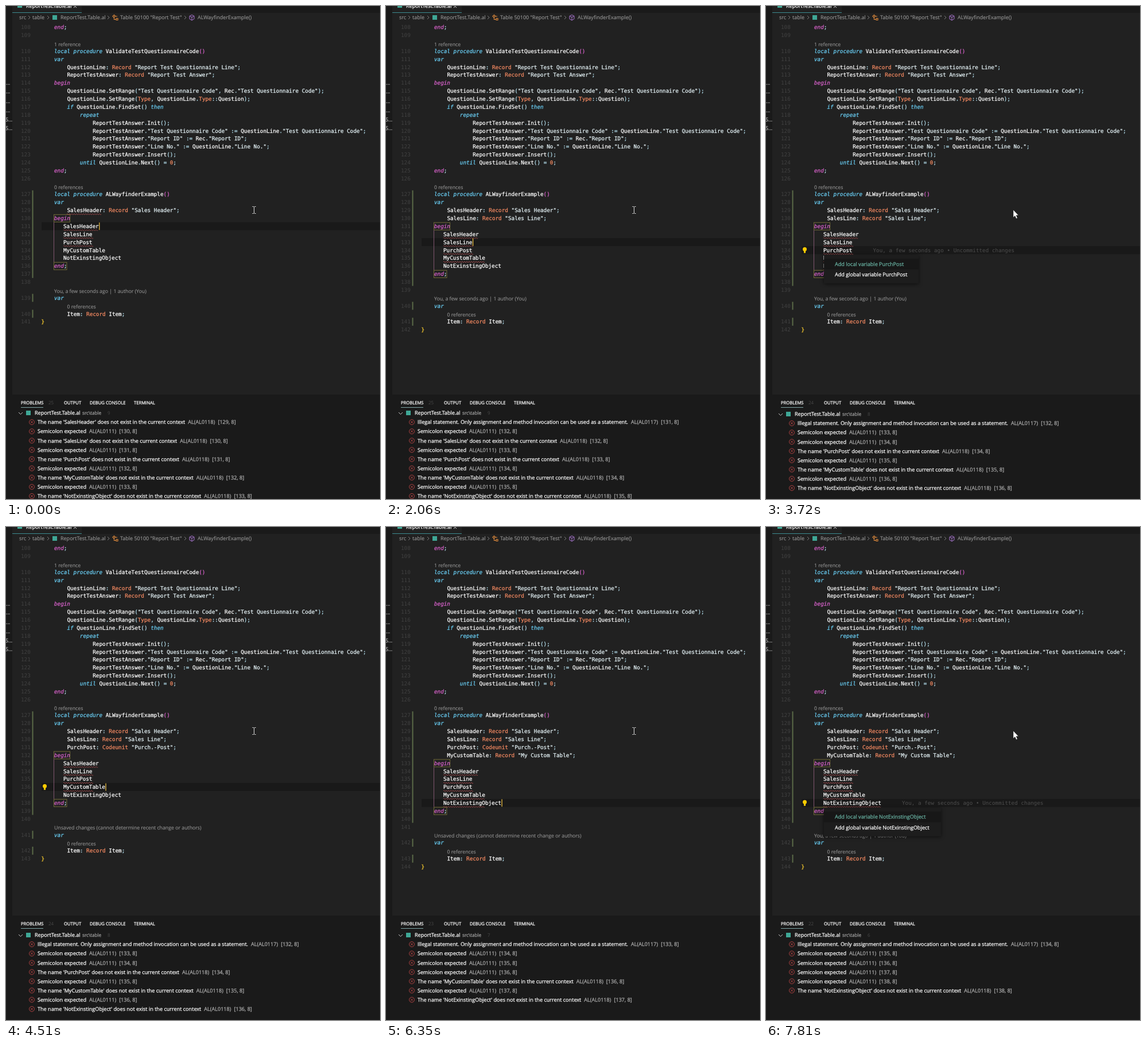
An HTML page for the animation above (8 s loop, 652x859 px).

```html
<!DOCTYPE html>
<html lang="en">
<head>
<meta charset="utf-8">
<title>Editor quick fixes</title>
<style>
html, body { margin: 0; width: 100%; height: 100%; overflow: hidden; background: #212121; }
svg { display: block; width: 652px; height: 859px; }
text { white-space: pre; text-rendering: geometricPrecision; color: #fff; font: 9.1px "Open Sans", "Noto Sans", sans-serif; }
text, tspan { fill: currentColor; stroke: currentColor; stroke-width: .25px; }
.code { font: 9.32px "DejaVu Sans Mono", "Noto Sans Mono", monospace; }
.code .kw { color: #69cdf3; font-style: italic; }
.code .block { color: #d862cb; font-style: italic; }
.code .paren { color: #d862cb; }
.code .type { color: #f58a62; }
.code .str { color: #e6f4f8; }
.code .op { color: #b5e0ef; }
.code.num { color: #414141; stroke-width: 0; }
.code.blame { color: #4d4d4d; stroke-width: 0; }
.code.gold { color: #ffd02e; }
.lens { color: #959595; font-size: 8.75px; stroke-width: .1px; }
.crumb { color: #9a9a9a; font-size: 9px; stroke-width: .1px; }
.tab { font-size: 7.65px; }
.dim { color: #adadad; }
.faint { color: #484848; font-size: 8px; stroke-width: 0; }
.path { color: #a2a2a2; font-size: 8.2px; }
.pick { color: #69b3a3; }
.wave { fill: none; stroke: #d45b5d; stroke-width: .7; }
.error { fill: none; stroke: #b84444; stroke-width: .9; }
</style>
</head>
<body>
<svg viewBox="0 0 652 859"><g id="back"></g><g id="live"></g></svg>
<script>
const CHAR = 5.61, PITCH = 13.87, LEFT = 61.5, LOOP = 8000;
const TEAL = '#3fa796';
const NAMES = ['SalesHeader', 'SalesLine', 'PurchPost', 'MyCustomTable', 'NotExinstingObject'];
const DECLS = [
  'SalesHeader: Record "Sales Header";', 'SalesLine: Record "Sales Line";',
  'PurchPost: Codeunit "Purch.-Post";', 'MyCustomTable: Record "My Custom Table";'
];
const FULL = NAMES.map(name => name.length);
const MENU_WIDTH = [162, 160, 165, 190, 204];
const YOU = 'You, a few seconds ago | 1 author (You)';
const UNSAVED = 'Unsaved changes (cannot determine recent change or authors)';

// Rows with "#" are reference hints and carry no line number.
const TOP = [
  [4, 'end;'], [0, ''], [4, '#1 reference'],
  [4, 'local procedure ValidateTestQuestionnaireCode()'], [4, 'var'],
  [8, 'QuestionLine: Record "Report Test Questionnaire Line";'],
  [8, 'ReportTestAnswer: Record "Report Test Answer";'],
  [4, 'begin'],
  [8, 'QuestionLine.SetRange("Test Questionnaire Code", Rec."Test Questionnaire Code");'],
  [8, 'QuestionLine.SetRange(Type, QuestionLine.Type::Question);'],
  [8, 'if QuestionLine.FindSet() then'], [12, 'repeat'],
  [16, 'ReportTestAnswer.Init();'],
  [16, 'ReportTestAnswer."Test Questionnaire Code" := QuestionLine."Test Questionnaire Code";'],
  [16, 'ReportTestAnswer."Report ID" := Rec."Report ID";'],
  [16, 'ReportTestAnswer."Line No." := QuestionLine."Line No.";'],
  [16, 'ReportTestAnswer.Insert();'],
  [12, 'until QuestionLine.Next() = 0;'],
  [4, 'end;'], [0, ''], [4, '#0 references'],
  [4, 'local procedure ALWayfinderExample()'], [4, 'var']
];

const STEPS = [
  [0, { decls: 1, cur: 0, lens: YOU, known: 0, badge: 25, waves: [11, 9, 9, 0, 0], declWave: 1, caret: 1, bulb: 0, blame: 0, menu: 0 }],
  [270, { cur: 1, lens: UNSAVED }],
  [690, { known: 1 }],
  [810, { waves: FULL, declWave: 0 }],
  [930, { bulb: 1 }],
  [1080, { caret: 0 }],
  [1200, { blame: 1 }],
  [1360, { lens: YOU }],
  [1510, { menu: 1 }],
  [1940, { menu: 0, caret: 1 }],
  [2060, { decls: 2, waves: [11, 9, 9, 13, 0], bulb: 0, blame: 0 }],
  [2460, { cur: 2, lens: UNSAVED }],
  [2740, { bulb: 1 }],
  [3010, { badge: 24, caret: 0 }],
  [3140, { waves: FULL }],
  [3300, { known: 2 }],
  [3420, { menu: 1 }],
  [3570, { blame: 1 }],
  [3720, { lens: YOU }],
  [3840, { menu: 0, caret: 1 }],
  [3960, { decls: 3, waves: [11, 9, 9, 9, 0], bulb: 0, blame: 0 }],
  [4390, { cur: 3, lens: UNSAVED }],
  [4510, { bulb: 1 }],
  [4800, { waves: [11, 9, 9, 13, 0], caret: 0 }],
  [5100, { known: 3, badge: 23 }],
  [5220, { waves: FULL }],
  [5340, { menu: 1 }],
  [5490, { blame: 1, lens: YOU }],
  [5800, { menu: 0, caret: 1 }],
  [5920, { decls: 4, waves: [11, 9, 9, 13, 13], bulb: 0, blame: 0 }],
  [6350, { cur: 4, lens: UNSAVED }],
  [6760, { waves: FULL, caret: 0 }],
  [7150, { known: 4, badge: 22, caret: 1 }],
  [7410, { bulb: 1, blame: 1, lens: YOU }],
  [7810, { menu: 1, caret: 0 }]
];

const rowY = row => 37 + PITCH * row;
const colX = col => LEFT + CHAR * col;
const text = (x, y, body, cls = '') => `<text x="${x}" y="${y + 3.2}" class="${cls}">${body}</text>`;
const rect = (x, y, w, h, fill, extra = '') => `<rect x="${x}" y="${y}" width="${w}" height="${h}" fill="${fill}" ${extra}/>`;
const line = (d, stroke, width = 1) => `<path d="${d}" fill="none" stroke="${stroke}" stroke-width="${width}"/>`;

const TOKENS = /("[^"]*")|\b(local|procedure|var|if|then|repeat|until)\b|\b(begin|end)\b|\b(Record|Codeunit|Type|0)\b|(\(\)$)|([.,:;=()]+)/g;
const KINDS = ['str', 'kw', 'block', 'type', 'paren', 'op'];
const paint = src => src.replace(TOKENS, (token, ...groups) =>
  `<tspan class="${KINDS[groups.slice(0, KINDS.length).findIndex(Boolean)]}">${token}</tspan>`);

function codeRows(rows, firstRow, firstNumber) {
  let number = firstNumber;
  return rows.map(([col, src], i) => {
    const y = rowY(firstRow + i), x = colX(col);
    if (src[0] === '#') return text(x, y + 1.6, src.slice(1), 'lens');
    return text(26, y, number++, 'code num') +
      (src === '}' ? text(x, y, src, 'code gold') : src && text(x, y, paint(src), 'code'));
  }).join('');
}

function wave(x, y, chars) {
  const humps = Math.round(chars * CHAR / 4);
  return `<path class="wave" d="M${x} ${y}${'q1-2 2 0t2 0'.repeat(humps)}"/>`;
}

function bracketBox(row, chars) {
  return rect(83.5, rowY(row) - 6.5, chars * CHAR, 13, 'none', 'stroke="#716a38"');
}

function problems(s) {
  const base = s.known ? 130 + s.known : 129;
  const missing = i => [`The name '${NAMES[i]}' does not exist in the current context`, 'AL0118', base + i];
  const list = [s.known ? ['Illegal statement. Only assignment and method invocation can be used as a statement.', 'AL0117', base] : missing(0)];
  for (let i = 1; i < 5; i++) {
    list.push(['Semicolon expected', 'AL0111', base + i]);
    if (i >= s.known) list.push(missing(i));
  }
  const top = s.known < 2 ? 709 : 711;
  const items = list.map(([message, code, at], i) => {
    const y = top + 16.1 * (i + 1);
    return `<g class="error"><circle cx="45" cy="${y}" r="4.5"/><path d="M43 ${y - 2}l4 4m0-4l-4 4"/></g>` +
      text(55, y, `${message}<tspan class="dim" dx="5">AL(${code})</tspan><tspan class="dim" dx="5">[${at}, 8]</tspan>`);
  }).join('');
  return line(`M22 ${top - 1}l3.5 3.5l3.5-3.5`, '#c5c5c5') + rect(35, top - 4, 8, 8, TEAL) +
    text(50, top, 'ReportTest.Table.al') + text(133, top, 'src\\table', 'path') +
    text(177, top, list.length, 'faint') + text(74, 691, s.badge, 'faint') + items;
}

function menu(s, y) {
  const name = NAMES[s.cur], width = MENU_WIDTH[s.cur];
  return rect(101, y + 8.5, width, 49.5, '#1d1d1d', 'style="filter:drop-shadow(0 1px 3px #0009)"') +
    rect(101, y + 15, width, 18.5, '#171717') +
    text(120, y + 24, `Add local variable ${name}`, 'pick') +
    text(120, y + 42.5, `Add global variable ${name}`);
}

function draw(s) {
  const begin = 23 + s.decls, end = begin + 6, nameX = 100;
  const curY = rowY(begin + 1 + s.cur), nameEnd = nameX + FULL[s.cur] * CHAR;
  const rows = [
    ...DECLS.slice(0, s.decls).map(src => [8, src]),
    [4, 'begin'], ...NAMES.map(name => [(nameX - LEFT) / CHAR, name]), [4, 'end;'],
    [0, ''], [0, ''], [4, '#' + s.lens], [4, 'var'], [8, '#0 references'], [8, 'Item: Record Item;'], [0, '}']
  ];
  const bar = (from, to) => rect(45.5, rowY(from) - 7, 2, (to - from + 1) * PITCH, '#5b6b48');
  return rect(62, curY - 7, 590, PITCH, '#191919') +
    bar(21, end + 1) + bar(end + 4, end + 4) + bar(end + 6, end + 6) +
    bracketBox(begin, 5) + bracketBox(end, 4) +
    line(`M83.5 ${rowY(begin) + 7}V${rowY(end) - 7}`, '#80566f') +
    codeRows(rows, 23, 129) +
    s.waves.map((chars, i) => chars ? wave(nameX, rowY(begin + 1 + i) + 6.8, chars) : '').join('') +
    (s.declWave ? wave(106, rowY(23) + 6.8, 11) : '') +
    (s.caret ? rect(nameEnd + .5, curY - 6.5, 1.2, 13, '#f5c542') : '') +
    (s.blame ? text(nameEnd + 36, curY, 'You, a few seconds ago • Uncommitted changes', 'code blame') : '') +
    (s.bulb ? `<circle cx="67.5" cy="${curY - 1.7}" r="3.5" fill="#ffcc00"/>` + rect(66, curY + 1, 3, 4, '#ffcc00') : '') +
    (s.menu ? menu(s, curY) : '') +
    problems(s) +
    (s.menu
      ? '<path d="M431 355v13.5l3-2.8l2.2 4.8l2.2-1l-2.1-4.7h4z" fill="#fff" stroke="#111" stroke-width=".6"/>'
      : line('M429.5 349.5h2l1 .8l1-.8h2M432.5 350v11M429.5 361.5h2l1-.8l1 .8h2', '#e0e0e0'));
}

function backdrop() {
  const chevron = x => line(`M${x} 17l3 3l-3 3`, '#858585', .9);
  return rect(0, 0, 11, 859, '#1a1a1a') + rect(132, 0, 520, 12, '#1a1a1a') + rect(11, 677, 641, 182, '#1a1a1a') +
    rect(11, 11, 121, 1, '#3b8c90') + rect(20, -5, 8, 8, TEAL) +
    text(35, 0, 'ReportTest.Table.al') + line('M118 -2l5 5m0-5l-5 5', '#ddd') +
    [134, 149, 166, 182].map(y => text(0, y, '...', 'dim')).join('') +
    [198, 213].map(y => text(-1, y, 'S...', 'dim')).join('') +
    text(23, 20, 'src', 'crumb') + chevron(39) + text(46, 20, 'table', 'crumb') + chevron(72) +
    rect(81, 16, 8, 8, TEAL) + text(95, 20, 'ReportTest.Table.al', 'crumb') + chevron(177) +
    line('M186 18l2.5-2.5l2 2l-2.5 2.5zM190 18h4M188.5 20v3.5h3M192 21.5h3v3h-3z', '#e08a3c', 1.1) +
    text(199, 20, 'Table 50100 "Report Test"', 'crumb') + chevron(311) +
    line('M324 15.5l4 2v5l-4 2.5l-4-2.5v-5zM320 17.5l4 2l4-2M324 19.5v5.5', '#a874d0') +
    text(334, 20, 'ALWayfinderExample()', 'crumb') +
    codeRows(TOP, 0, 108) +
    text(26, 691, 'PROBLEMS', 'tab') + text(101, 691, 'OUTPUT', 'tab') +
    text(146, 691, 'DEBUG CONSOLE', 'tab') + text(223, 691, 'TERMINAL', 'tab') +
    rect(26, 699, 39, 1, '#7fa5a5');
}

const live = document.getElementById('live');
let shown = -1;

function tick(now) {
  const time = now % LOOP;
  const step = STEPS.findLastIndex(([at]) => at <= time);
  if (step !== shown) {
    shown = step;
    live.innerHTML = draw(Object.assign({}, ...STEPS.slice(0, step + 1).map(([, patch]) => patch)));
  }
  requestAnimationFrame(tick);
}

document.getElementById('back').innerHTML = backdrop();
tick(0);
</script>
</body>
</html>
```
